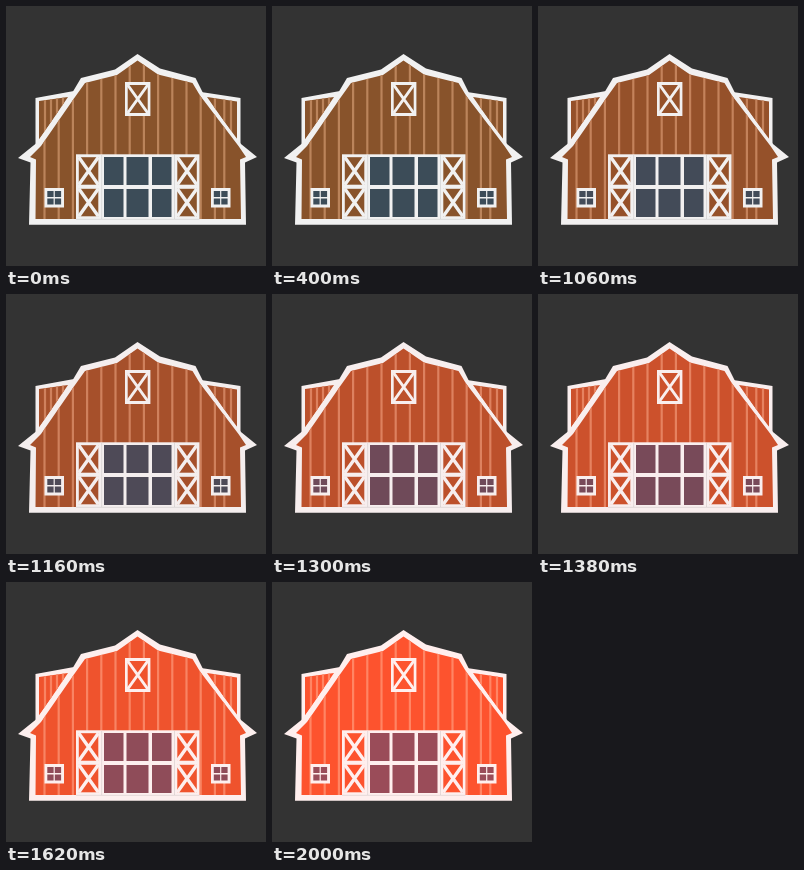
Write an HTML page that moves like this. It is 260x260 px and loops after 4.04 s.

```html
<!DOCTYPE html>
<html lang="en">
<head>
<meta charset="utf-8">
<title>Barn</title>
<style>
html, body { margin: 0; width: 100%; height: 100%; overflow: hidden; background: #333; }
svg { display: block; width: 100vw; height: 100vh; }
.wall { fill: var(--wall); }
.trim { fill: var(--trim); }
.glass { fill: var(--glass); }
.bars { stroke: var(--trim); fill: none; }
.stripes { stroke: var(--stripe); stroke-width: 2.2; fill: none; }
</style>
</head>
<body>
<svg id="stage" viewBox="0 0 260 260">
  <defs>
    <path id="frontWall" d="M131.5 54.5L152 68.5L186.5 77L194 89.5L232.5 140L240 151L234 153.5L235 213H29.5L30 153.5L24 151L35 140L69 91L79 77L111 69Z"/>
    <path id="wingWall" d="M33 95L62 91L33 134ZM201 91L231 95.5V134Z"/>
    <clipPath id="front"><use href="#frontWall"/></clipPath>
    <clipPath id="wings"><use href="#wingWall"/></clipPath>
  </defs>
  <path class="trim" d="M29.5 92L68 85V142H29.5ZM195 86L234.5 92V142H195Z"/>
  <use href="#wingWall" class="wall"/>
  <path id="wingStripes" class="stripes" clip-path="url(#wings)"/>
  <path class="trim" d="M131.5 48L154 62.5L189.5 72L198 89L235 138L251 151L239 156.5L240 218.7H23L24.5 156.5L12 152L30 137.5L65.5 88L75 72L109 63.5Z"/>
  <use href="#frontWall" class="wall"/>
  <path id="frontStripes" class="stripes" clip-path="url(#front)"/>
  <g id="details"></g>
</svg>
<script>
const LOOP = 4040;
const TIMES = [0, 1000, 1160, 1300, 1500, 1740, 2000];
const PALETTE = {
  wall: ['88532b', '8b522a', 'a6502b', 'bc502b', 'e3532e', 'fb532d', 'fd532e'],
  stripe: ['bb845b', 'bd835a', 'cf815d', 'dd815f', 'f38362', 'ff8463', 'ff8564'],
  glass: ['3c4c58', '3d4c58', '4e4a57', '6f4a59', '864b5a', '984c59', '9a4c59'],
  trim: ['f1f1f1', 'f1f1f1', 'f4eeee', 'f7eeee', 'fbeeed', 'ffefee', 'ffefee']
};
const byId = id => document.getElementById(id);
const stage = byId('stage');
const verticals = (xs, top, bottom) => xs.map(x => `M${x} ${top}V${bottom}`).join('');
const rect = (cls, x, y, w, h) =>
  `<rect class="${cls}" x="${x}" y="${y}" width="${w}" height="${h}"/>`;

function crossed(x, y, w, h, line) {
  return rect('wall', x, y, w, h) +
    `<path class="bars" stroke-width="${line}" d="M${x} ${y}l${w} ${h}M${x + w} ${y}l${-w} ${h}"/>`;
}

function smallWindow(x) {
  let out = rect('trim', x, 182, 19.5, 19.5);
  for (const dx of [2.8, 10.3])
    for (const dy of [3, 10.5]) out += rect('glass', x + dx, 182 + dy, 6.3, 6);
  return out;
}

function drawDetails() {
  let out = rect('trim', 119, 76, 25.4, 34) + crossed(121.7, 79, 20, 28, 3);
  out += rect('trim', 70, 148.3, 123.5, 65.2);
  for (const x of [72.8, 171.3])
    for (const y of [151.2, 182.8]) out += crossed(x, y, 19.5, 27.5, 3.4);
  for (const [x, w] of [[98, 19.5], [120.5, 22], [146, 19.5]])
    for (const y of [151, 183]) out += rect('glass', x, y, w, 28);
  out += '<path d="M70 213.3H193.5M95.7 149V213M168.5 149V213" stroke="#777" stroke-opacity=".3" stroke-width=".6"/>';
  return out + smallWindow(38.5) + smallWindow(205);
}

const rgb = hex => [0, 2, 4].map(i => parseInt(hex.slice(i, i + 2), 16));

function colourAt(list, t) {
  let i = TIMES.length - 1;
  while (TIMES[i] > t) i--;
  if (i === TIMES.length - 1) return `#${list[i]}`;
  const k = (t - TIMES[i]) / (TIMES[i + 1] - TIMES[i]);
  // The brown settles early, then rests until the change to red.
  const p = i === 0 ? Math.min(1, t / 400) * 0.1 : k;
  const a = rgb(list[i]), b = rgb(list[i + 1]);
  return `rgb(${a.map((v, n) => Math.round(v + (b[n] - v) * p)).join(',')})`;
}

function render(t) {
  for (const part in PALETTE) stage.style.setProperty(`--${part}`, colourAt(PALETTE[part], t));
}

const boards = Array.from({ length: 13 }, (_, i) => 38.5 + 14.2 * i);
byId('frontStripes').setAttribute('d', verticals([...boards, 218.3], 50, 213));
byId('wingStripes').setAttribute('d', verticals([39, 45, 51, 57, 208.9, 218.3, 225], 88, 140));
byId('details').innerHTML = drawDetails();

const start = performance.now();
function tick() {
  render((performance.now() - start) % LOOP);
  requestAnimationFrame(tick);
}
tick();
</script>
</body>
</html>
```
